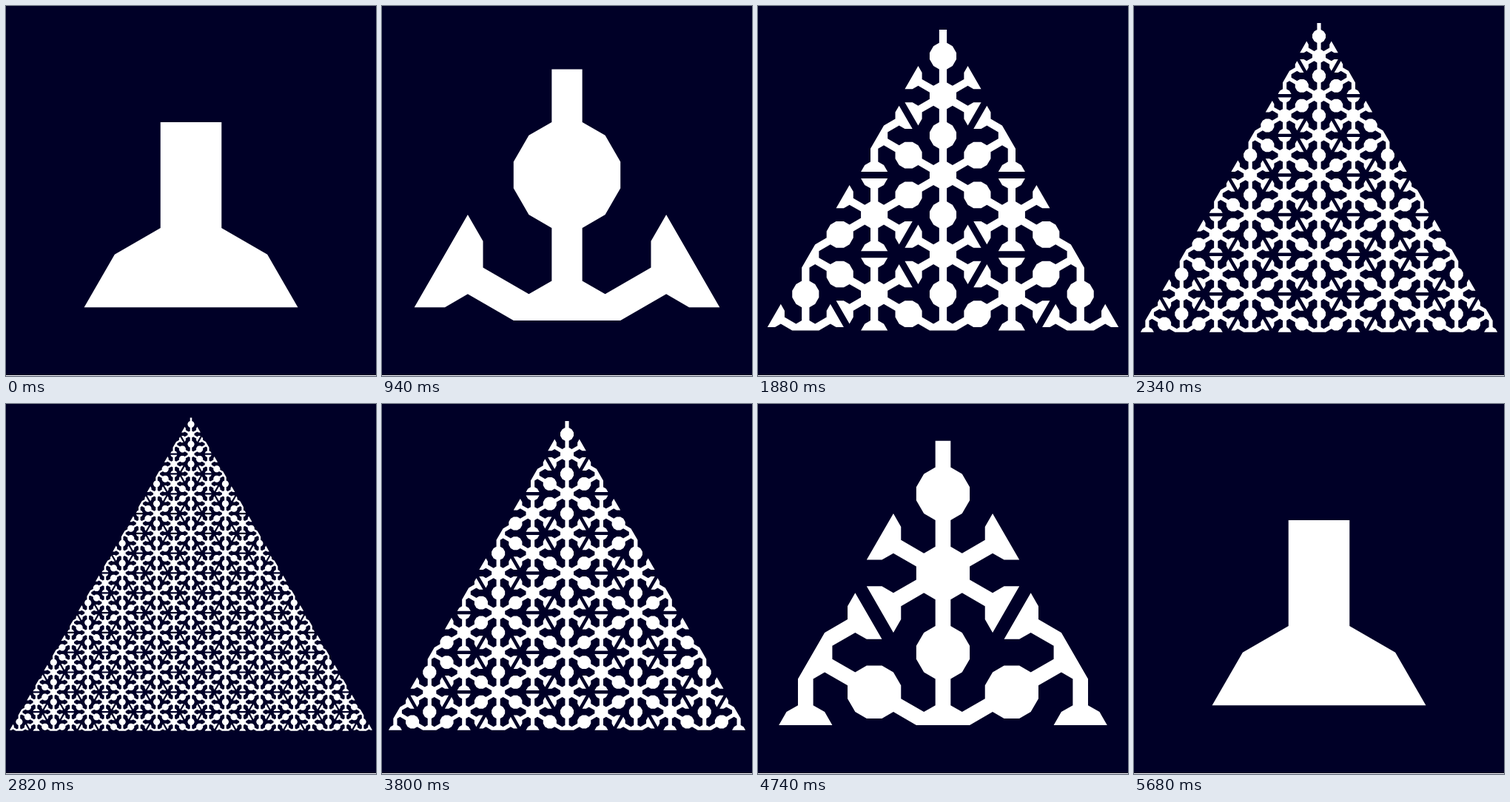
An HTML page for the animation above (5.73 s loop, 500x500 px).

```html
<!DOCTYPE html>
<html lang="en">
<head>
<meta charset="utf-8">
<title>Triangle substitution</title>
<style>
  html, body { margin: 0; width: 100%; height: 100%; overflow: hidden; background: #000027; }
  svg { display: block; width: 100%; height: 100%; }
</style>
</head>
<body>
<svg viewBox="0 0 500 500">
  <rect width="500" height="500" fill="#000027"/>
  <rect y="499" width="500" height="1" fill="#fff"/>
  <path id="tiles" fill="#fff"/>
</svg>
<script>
const LOOP = 5730;
const CHANGES = [940, 1400, 1880, 2340, 2820, 3800, 4260, 4740, 5200, 5680];
const MAX_LEVEL = 5;
const SIDE = 495.2, TOP = 14.05, BOTTOM = TOP + SIDE * Math.sqrt(3) / 2;

const mid = (p, q) => [(p[0] + q[0]) / 2, (p[1] + q[1]) / 2];
const polygon = points =>
  'M' + points.map(p => p.map(v => v.toFixed(3)).join(' ')).join('L') + 'Z';

// A tile is a triangle: its stem points to `tip`, its foot lies along a-b.
// Joined tiles extend the foot to meet their mirror image.
function subdivide({ tip, a, b }) {
  const ma = mid(tip, a), mb = mid(tip, b), base = mid(a, b);
  return [
    { tip, a: ma, b: mb, joined: true },
    { tip: base, a: mb, b: ma, joined: true },
    { tip: base, a: ma, b: a },
    { tip: base, a: b, b: mb }
  ];
}

// Half of the flask outline as [offset, row], in twelfths of the triangle.
const PROFILE = [[1, 4], [1, 8], [2.5, 9], [3.5, 11]];

function flask({ tip, a, b, joined }) {
  const base = mid(a, b);
  const place = ([x, row]) => [0, 1].map(k =>
    tip[k] + ((base[k] - tip[k]) * row + (b[k] - a[k]) * x) / 12);
  const right = joined ? [...PROFILE, [3.5, 12]] : PROFILE;
  const left = right.map(([x, row]) => [-x, row]).reverse();
  return [...right, ...left].map(place);
}

function drawing(tiles) {
  const hubs = new Map();
  const shapes = tiles.map(tile => {
    const points = flask(tile);
    const key = tile.tip.map(v => Math.round(v * 10)).join();
    if (!hubs.has(key)) hubs.set(key, { center: tile.tip, ends: [] });
    hubs.get(key).ends.push(points[0], points[points.length - 1]);
    return polygon(points);
  });
  // Stems that share a tip are bridged by the hull of their ends.
  for (const { center, ends } of hubs.values()) {
    if (ends.length < 4) continue;
    const angle = p => Math.atan2(p[1] - center[1], p[0] - center[0]);
    shapes.push(polygon(ends.sort((p, q) => angle(q) - angle(p))));
  }
  return shapes.join('');
}

let tiles = [{
  tip: [250, TOP],
  a: [250 - SIDE / 2, BOTTOM],
  b: [250 + SIDE / 2, BOTTOM]
}];
const drawings = [];
for (let level = 0; level <= MAX_LEVEL; level++) {
  drawings.push(drawing(tiles));
  tiles = tiles.flatMap(subdivide);
}

const path = document.getElementById('tiles');
let shown = -1;

function render(time) {
  const step = CHANGES.filter(t => t <= time % LOOP).length;
  const level = Math.min(step, 2 * MAX_LEVEL - step);
  if (level === shown) return;
  shown = level;
  path.setAttribute('d', drawings[level]);
}

const start = performance.now();
function tick() {
  render(performance.now() - start);
  requestAnimationFrame(tick);
}
tick();
</script>
</body>
</html>
```
